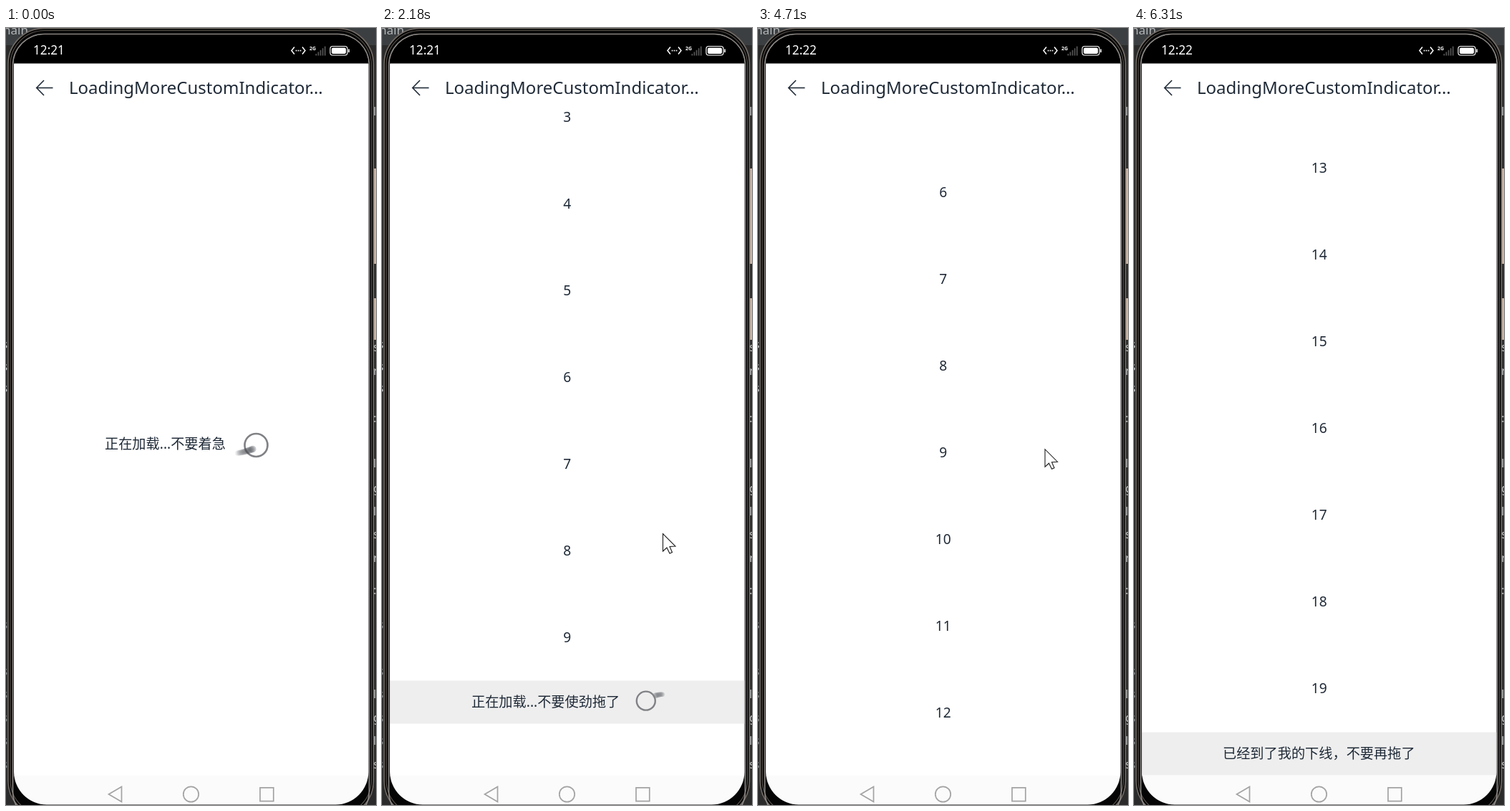
Animation of 517x1084 px, one loop 6710 ms. Source, as an HTML page with a canvas:

```html
<!DOCTYPE html>
<html lang="zh-CN">
<head>
<meta charset="utf-8">
<style>
html, body { margin: 0; width: 100%; height: 100%; overflow: hidden; background: #2b2b2b; }
canvas { display: block; width: 517px; height: 1084px; }
</style>
</head>
<body>
<canvas id="stage" width="517" height="1084"></canvas>
<script>
const ctx = document.getElementById('stage').getContext('2d');
const LOOP = 6710, TAU = Math.PI * 2;
const FONT = '"Noto Sans", "Noto Sans CJK SC", "Noto Sans CJK", sans-serif';
const INK = '#1f2a37';
const TOP = 117, BOTTOM = 1043, ROW = 121;

// Screen refreshes: start, end, number of equal steps
const runs = [
  [0, 730, 11], [800, 1160, 5], [1620, 2250, 9], [2320, 2940, 9], [3010, 3630, 9],
  [3700, 4040, 5], [4370, 4990, 9], [5060, 5690, 9], [5760, 6310, 8]
];
const scrollKeys = [
  [1620, 0], [1690, 40], [1830, 200], [1970, 350], [2040, 402], [2110, 424], [2180, 417.5]
];
const flingKeys = [
  [4510, 345.5], [4600, 420], [4700, 630], [4850, 1100], [4990, 1475], [5060, 1580], [5130, 1621.5]
];
const pointerKeys = [
  [1620, 372, 670], [1690, 373, 630], [1830, 378, 480], [1970, 382, 520], [2180, 392, 705],
  [2320, 400, 735], [4370, 400, 735], [4500, 397, 788], [4560, 397, 788], [4780, 402, 502],
  [5690, 402, 502], [6240, 488, 1066]
];

function snap(t) {
  let run = runs[0];
  for (const r of runs) if (t >= r[0] - 4) run = r;
  const [start, end, n] = run, step = (end - start) / n;
  return start + Math.max(0, Math.min(n, Math.floor((t - start + 6) / step))) * step;
}

function track(keys, t, col = 1) {
  if (t <= keys[0][0]) return keys[0][col];
  for (let i = 1; i < keys.length; i++) {
    const a = keys[i - 1], b = keys[i];
    if (t <= b[0]) return a[col] + (b[col] - a[col]) * (t - a[0]) / (b[0] - a[0]);
  }
  return keys[keys.length - 1][col];
}

function scrollAt(t) {
  if (t <= 2180) return track(scrollKeys, t);
  if (t < 4370) return 345.5 + 72 * Math.exp((2180 - t) / 140);
  if (t <= 5130) return track(flingKeys, t);
  return 1555.5 + 66 * Math.exp((5130 - t) / 130);
}

function text(str, x, y, size, color = INK, align = 'left', weight = 400) {
  ctx.font = `${weight} ${size}px ${FONT}`;
  ctx.fillStyle = color;
  ctx.textAlign = align;
  ctx.fillText(str, x, y);
}

function rect(x, y, w, h, color) {
  ctx.fillStyle = color;
  ctx.fillRect(x, y, w, h);
}

function round(x, y, w, h, r) {
  ctx.beginPath();
  ctx.roundRect(x, y, w, h, r);
}

function line(points, color, width, closed) {
  ctx.beginPath();
  points.forEach(([x, y]) => ctx.lineTo(x, y));
  if (closed) ctx.closePath();
  stroke(color, width);
}

function stroke(color, width) {
  ctx.strokeStyle = color;
  ctx.lineWidth = width;
  ctx.stroke();
}

function disc(x, y, r) {
  ctx.beginPath();
  ctx.arc(x, y, r, 0, TAU);
}

function backdrop() {
  rect(0, 0, 517, 1084, '#2b2b2b');
  rect(0, 0, 517, 24, '#3c3f41');
  text('nain', -4, 9, 17, '#b4b6b8');
  rect(151, 0, 9, 3, '#9b9c9d');
  rect(356, 0, 9, 3, '#9b9c9d');
  rect(513, 196, 4, 133, '#cbb6a4');
  rect(513, 377, 4, 58, '#cbb6a4');
  [122, 451, 484, 550, 613, 648, 680, 712, 745, 790, 935, 968, 1000, 1033].forEach((y, i) =>
    text('lsr:lg'[i % 6], 513, y, 17, '#c6c8ca'));
  [447, 478, 508, 838, 903, 935, 968, 1000, 1033].forEach((y, i) =>
    text('s', -6, y, 17, i < 3 ? '#d5d7d9' : '#8d9092'));
}

function phone() {
  round(3, 0.5, 510.5, 1100, 50);
  ctx.fillStyle = '#050505';
  ctx.fill();
  stroke('#746d67', 1.6);
  round(6, 3.5, 504.5, 1094, 48);
  stroke('#57514c', 1.2);
  round(9.5, 8.5, 498, 1100, 44);
  stroke('#8e8a87', 1.6);

  ctx.save();
  round(11, 9.5, 495.5, 1074, [42, 42, 46, 46]);
  ctx.clip();
  rect(11, 9, 496, 41, '#000');
  rect(11, 49.5, 496, 994, '#fff');
  rect(11, BOTTOM, 496, 41, '#fbfbfb');
  ctx.restore();
}

function statusBar(t) {
  text(t < 4700 ? '12:21' : '12:22', 38, 37, 17.2, '#fff', 'left', 500);
  line([[403, 26.5], [399, 31.5], [403, 36.5]], '#fff', 1.5);
  line([[414, 26.5], [418, 31.5], [414, 36.5]], '#fff', 1.5);
  [405.5, 408.5, 411.5].forEach(x => rect(x - 0.8, 30.7, 1.7, 1.7, '#fff'));
  text('2G', 424, 31, 7, '#fff', 'left', 700);
  for (let i = 0; i < 5; i++) rect(432.5 + i * 3.1, 36 - i * 2.6, 1.7, 2.5 + i * 2.6, '#555');
  round(453, 25.5, 24, 12.5, 3.5);
  stroke('#fff', 1.2);
  round(455, 27.5, 20, 8.5, 2);
  ctx.fillStyle = '#fff';
  ctx.fill();
  rect(478.3, 29.5, 1.6, 4.5, '#fff');
}

function chrome(t) {
  statusBar(t);
  line([[65.5, 83.5], [43, 83.5]], INK, 1.6);
  line([[53, 73], [42.7, 83.5], [53, 94]], INK, 1.6);
  text('LoadingMoreCustomIndicator…', 88, 92, 24, INK, 'left', 500);
  line([[143.5, 1069], [161.5, 1058.5], [161.5, 1079.5]], '#a3a3a3', 1.7, true);
  disc(258.5, 1069, 10.7);
  stroke('#a3a3a3', 1.7);
  ctx.beginPath();
  ctx.rect(355, 1059.8, 18.8, 18.8);
  stroke('#a3a3a3', 1.7);
}

// Ring with a comet on a tilted orbit; the far half passes behind the ring
function spinner(x, y, r, phase) {
  const k = r / 13, cy = y + 1.4 * k * Math.sin(phase);
  const tilt = 0.35, c = Math.cos(tilt), s = Math.sin(tilt);
  const comet = () => {
    for (let i = 15; i >= 0; i--) {
      const a = phase - i * 0.066, far = Math.sin(a) < 0;
      const u = -25 * k * Math.cos(a), v = 3 * k * Math.sin(a);
      const px = x + u * c + v * s, py = cy - u * s + v * c;
      if (far && Math.hypot(px - x, py - cy) < r) continue;
      disc(px, py, k * (3.9 - i * 0.06));
      ctx.fillStyle = `rgba(70,74,80,${(far ? 0.16 : 0.3) * (1 - i / 16)})`;
      ctx.fill();
    }
  };
  const front = Math.sin(phase) > 0;
  if (!front) comet();
  disc(x, cy, r);
  stroke('#818286', 2.4 * Math.sqrt(k));
  if (front) comet();
}

function list(t) {
  const count = t < 4036 ? 10 : 20, offset = scrollAt(t);
  ctx.save();
  ctx.beginPath();
  ctx.rect(11, TOP, 495.5, BOTTOM - TOP);
  ctx.clip();
  for (let n = 0; n < count; n++) {
    const y = 178 + n * ROW - offset;
    if (y > TOP - 20 && y < BOTTOM + 20) text(n, 258.7, y + 7, 19.2, INK, 'center');
  }
  const top = 178 + (count - 1) * ROW - offset + 61;
  if (top < BOTTOM) {
    rect(11, top, 495.5, 60, '#eee');
    if (count === 10) {
      text('正在加载...不要使劲拖了', 125, top + 36.5, 19.2);
      spinner(368.8, top + 29.3, 13, TAU * (60 / 360 + (t - 2800) / 1200));
    } else {
      text('已经到了我的下线，不要再拖了', 124, top + 36.5, 19.2);
    }
  }
  ctx.restore();
}

function pointer(t) {
  if (t < 1620 || t > 6290) return;
  ctx.save();
  ctx.translate(track(pointerKeys, t, 1) + 0.5, track(pointerKeys, t, 2) + 0.5);
  ctx.beginPath();
  [[0, 0], [0, 24.5], [5.5, 19.5], [9.5, 27.5], [13, 26], [9.5, 18], [17.5, 17.5]]
    .forEach(([x, y]) => ctx.lineTo(x, y));
  ctx.closePath();
  ctx.fillStyle = '#fff';
  ctx.fill();
  stroke('#1c1c1c', 1.1);
  ctx.restore();
}

function draw(now) {
  const t = snap(now % LOOP);
  backdrop();
  phone();
  chrome(t);
  if (t < 1155) {
    text('正在加载...不要着急', 138, 587, 19.2);
    spinner(349.5, 580.3, 16, TAU * (78 / 360 + t / 1200));
  } else {
    list(t);
  }
  pointer(t);
}

const began = performance.now();
function tick() {
  draw(performance.now() - began);
  requestAnimationFrame(tick);
}
tick();
</script>
</body>
</html>
```
